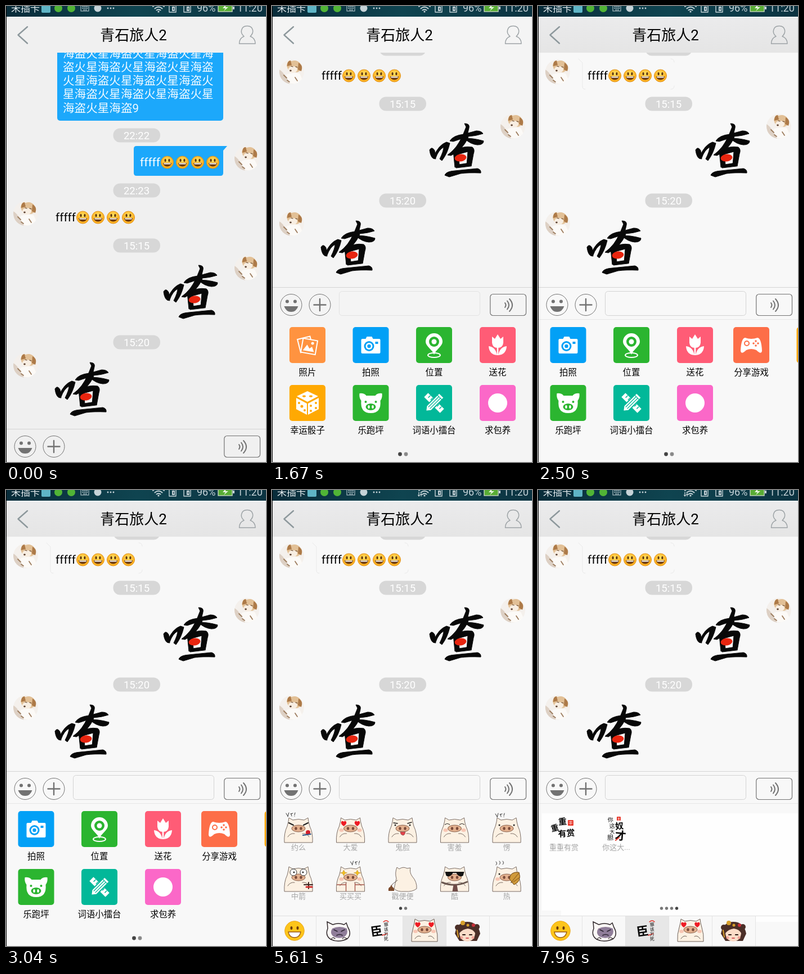
An HTML page that plays this animation: 462x811 px, repeating every 8000 ms.

```html
<!DOCTYPE html>
<html lang="zh">
<head>
<meta charset="utf-8">
<style>
html, body { margin: 0; width: 100%; height: 100%; overflow: hidden; background: #f0f0f0; }
svg { display: block; font-family: Roboto, "Noto Sans CJK SC", "Noto Sans CJK", sans-serif; }
.bg { fill: var(--bg); }
.line { fill: none; stroke-linecap: round; stroke-linejoin: round; }
</style>
</head>
<body>
<svg id="stage" width="462" height="811" viewBox="0 0 462 811"></svg>
<script>
const LOOP = 8000;

// Each step overrides parts of the state before it.
const steps = [
  { t: 0, bg: '#f0f0f0', shift: 0, view: '', s: 0, dot: 0, p: 0, box: 0, trim: 0, wifi: 0, white: 0 },
  { t: 270, bg: '#f3f3f3', shift: -252, view: 'tools' },
  { t: 1670, bg: '#f4f4f4', box: 0.55 },
  { t: 1790, s: 190, dot: 1 },
  { t: 2230, bg: '#f6f6f6', s: 226, box: 0.75 },
  { t: 2380, s: 172 },
  { t: 2500, bg: '#f8f8f8', s: 122, dot: 0, box: 1, trim: 1 },
  { t: 3310, view: 'stickers' },
  { t: 5610, wifi: 1 },
  { t: 7570, p: 0.35 },
  { t: 7690, p: 0.8 },
  { t: 7840, p: 0.97, white: 1 },
  { t: 7960, p: 1 }
];

const text = (x, y, size, str, fill = '#000', more = 'text-anchor="middle"') =>
  `<text x="${x}" y="${y}" font-size="${size}" fill="${fill}" ${more}>${str}</text>`;
const rect = (x, y, w, h, fill, more = '') =>
  `<rect x="${x}" y="${y}" width="${w}" height="${h}" fill="${fill}" ${more}/>`;
const oval = (x, y, rx, ry, fill, more = '') =>
  `<ellipse cx="${x}" cy="${y}" rx="${rx}" ry="${ry}" fill="${fill}" ${more}/>`;
const disc = (x, y, r, fill, more = '') => oval(x, y, r, r, fill, more);
const path = (d, fill, more = '') => `<path d="${d}" fill="${fill}" ${more}/>`;
const line = (d, color, w = 1, more = '') =>
  `<path class="line" d="${d}" stroke="${color}" stroke-width="${w}" ${more}/>`;
const at = (x, y, body, more = '') => `<g transform="translate(${x} ${y}) ${more}">${body}</g>`;
const ring = (color, w = 1) => `stroke="${color}" stroke-width="${w}"`;

const smile = (x, y) => at(x, y,
  disc(0, 0, 11, 'url(#gold)', ring('#dd8d16', 0.9)) +
  oval(-3.4, -3.6, 1.6, 2.7, '#5b3410') + oval(3.4, -3.6, 1.6, 2.7, '#5b3410') +
  path('M-7.5 1H7.5C7 9.500 -7 9.500 -7.5 1Z', '#6b3a12') + path('M-6.500 1.500H6.500L5.800 3.600H-5.800Z', '#fff'));

const avatar = (x, y) => at(x, y, `<g clip-path="url(#round)">` +
  disc(0, 0, 22, '#f4f0ec') +
  path('M-22 -4Q-15 0 -11 9L-3 22H-22Z', '#ddd0c4') +
  path('M-9 -11Q-7 -22 0 -19Q9 -22 15 -15L18 -6Q14 2 4 1Q-6 2 -9 -11Z', '#e2c096') +
  path('M-8 -10Q-8 -20 -2 -20L0 -12ZM12 -16Q21 -12 17 -1L11 -4Z', '#ad7a48') +
  oval(2, -4, 8, 6, '#f8eee2') + oval(-2, -2, 1.8, 1.4, '#5a4032') +
  line('M-1 -10L2 -9M7 -9L10 -8', '#68482f', 1.3) +
  path('M-10 5Q0 0 14 3L20 16Q8 24 -4 20Z', '#fcfaf7') +
  line('M-14 6L-9 11M-8 15L-4 18M6 10L10 16', '#9c7c5e', 1.8) + '</g>');

const pill = (y, str) => rect(190.5, y - 12.5, 83.5, 25, '#d7d7d7', 'rx="12"') +
  text(232, y + 6.5, 18.5, str, '#fff');

const fives = (x, y, color) => text(x, y, 20.7, 'fffff', color, '') +
  [0, 1, 2, 3].map(i => smile(x + 48.5 + i * 27, y - 7)).join('');

// Brush strokes of the big character: mouth, tree, sun, base.
const strokes = [
  'M1 48Q5 41 10 49L12 64Q3 65 1 48Z',
  'M8 60Q17 39 31 34L37 36Q33 54 23 67L19 64Q26 50 26 43Q17 48 12 62Z',
  'M63 1Q73 1 71 9L66 30L57 42L60 22L66 7Z',
  'M37 32Q43 22 62 20L84 14Q93 14 96 19Q84 23 70 24L43 33Z',
  'M59 23L70 25Q60 48 39 58L33 57Q51 44 59 23Z',
  'M63 28Q76 26 97 32Q97 39 86 39Q74 38 63 28Z',
  'M43 49L52 46L54 76L46 79Z',
  'M46 50Q60 40 77 43Q82 47 79 55L75 77L67 76L69 51L51 56Z',
  'M47 75L72 71L73 77L48 80Z',
  'M28 93Q30 86 46 85L86 81Q93 83 92 89Q70 88 56 90L36 96Z'
].join('');
const bigWord = (x, y) => at(x, y, path(strokes, '#080808', 'stroke="#080808" stroke-linejoin="round"') +
  oval(56, 62, 10.5, 6.5, '#e8250f', 'transform="rotate(-8 56 62)"'));

const longLine = '海盗火星'.repeat(14);
const lines = [0, 1, 2, 3].map(i => longLine.substr(i * 13, 13)).concat('海盗火星海盗9');

const list =
  rect(91, 40, 295, 164, '#1ca8fb', 'rx="5"') +
  lines.map((l, i) => text(101, 91.5 + i * 24.3, 20.6, l, '#f2faff', '')).join('') +
  pill(230, '22:22') + pill(328, '22:23') + pill(426, '15:15') + pill(598, '15:20') +
  path('M232 249H393L386 257V297Q386 302 381 302H232Q227 302 227 297V254Q227 249 232 249Z', '#1ca8fb') +
  fives(238, 285, '#fff') +
  `<g id="trim">${line('M72 346L79 353V395Q79 400 84 400M236 346Q242 346 242 352M242 394Q242 400 236 400', '#e9e9e9')}</g>` +
  fives(88, 383, '#000') +
  avatar(428, 271) + avatar(35, 369) + avatar(428, 466) + avatar(35, 639) +
  bigWord(279, 460) + bigWord(86, 633);

const grey = '#727272';
const bar = `<rect class="bg" x="1" y="752" width="461" height="320"/>` +
  rect(1, 752, 461, 1, '#d4d4d4') +
  disc(34, 783.5, 19, 'none', ring(grey)) + disc(27, 777.5, 3, grey) + disc(41, 777.5, 3, grey) +
  path('M21.5 786H46.5Q43 796 34 796Q25 796 21.5 786Z', grey) +
  disc(85, 783.5, 19, 'none', ring(grey)) + line('M74.5 783.5H95.5M85 773V794', grey, 2.4) +
  `<g id="box">${rect(119.5, 759.5, 250, 43, 'none', 'rx="5" ' + ring('#d3d3d3'))}</g>` +
  rect(387.8, 764.5, 63.7, 38, 'none', 'rx="5" ' + ring(grey, 1.2)) +
  line('M414 780Q417 784 414 788M418 776.5Q424 784 418 791.5M422 773Q432 784 422 795', grey, 2);

const W = '#fff';
const glyphs = {
  photo: c => at(-4, 0, rect(-11, -13, 23, 24, 'none', ring(W, 2)), 'rotate(-14)') +
    at(3, 3, rect(-13, -13, 26, 25, c, ring(W, 2)) + path('M-10 8L-4 -3L1 3L5 -1L10 8Z', W) + disc(5, -7, 2.5, W), 'rotate(10)'),
  camera: c => path('M-15 -11H-9L-7 -15H2L4 -11H15Q17 -11 17 -9V13Q17 15 15 15H-15Q-17 15 -17 13V-9Q-17 -11 -15 -11Z', W) +
    disc(-3, 2, 9, c) + disc(-3, 2, 6, W) + disc(-3, 2, 3.2, c) + rect(8, -6, 5, 4, c),
  pin: c => oval(0, 18, 11, 4, 'none', ring(W, 2)) + path('M0 17C-3 8 -15 2 -15 -6A15 15 0 0 1 15 -6C15 2 3 8 0 17Z', W) +
    disc(0, -6, 9, c) + disc(0, -6, 4.5, W),
  tulip: () => path('M-10 -15L-5 -11L0 -19L5 -11L10 -15V-4Q9 5 0 5Q-9 5 -10 -4Z', W) + rect(-1.3, 3, 2.6, 15, W) +
    path('M-1 18Q-15 17 -16 2Q-4 3 -1 18ZM1 18Q15 17 16 2Q4 3 1 18Z', W),
  dice: c => path('M0 -21L19 -12L0 -2L-19 -12ZM-20 -9L-1 1V21L-20 11ZM20 -9L1 1V21L20 11Z', W) +
    oval(-6, -12, 3, 1.8, c) + oval(6, -12, 3, 1.8, c) + disc(-10, 6, 2.5, c) + disc(-15, 0, 2, c) + disc(-5, 13, 2, c) +
    disc(6, 5, 2, c) + disc(15, 0, 2, c) + disc(6, 14, 2, c) + disc(15, 9, 2, c),
  pig: c => path('M-20 -17Q-12 -18 -8 -13H8Q12 -18 20 -17Q21 -9 17 -4Q19 18 0 18Q-19 18 -17 -4Q-21 -9 -20 -17Z', W) +
    disc(-9, -2, 2, c) + disc(9, -2, 2, c) + oval(0, 7, 9, 6, c) + oval(-3.5, 7, 1.8, 3, W) + oval(3.5, 7, 1.8, 3, W),
  pencil: c => at(0, 0, rect(-20, -5, 40, 10, W) + line('M-14 -4V0M-8 -4V0M8 -4V0M14 -4V0', c, 1.5), 'rotate(45)') +
    at(0, 0, path('M-21 0L-13 -6H19V6H-13Z', W, ring(c, 2)) + line('M-12 -2H14M-12 2H14M14 -6V6', c, 1.3), 'rotate(-45)'),
  ball: () => disc(0, 0, 17, W),
  pad: c => path('M-11 -13Q0 -9 11 -13Q18 -12 19 10Q18 18 9 9Q0 5 -9 9Q-18 18 -19 10Q-18 -12 -11 -13Z', W) +
    disc(-8, -3, 4, 'none', ring(c, 2)) + disc(8, -7, 1.8, c) + disc(8, 1, 1.8, c) + disc(4, -3, 1.8, c) + disc(12, -3, 1.8, c),
  card: c => rect(-20, -11, 40, 27, W, 'rx="2"') + rect(-14, -16, 5, 8, W, ring(c)) + rect(9, -16, 5, 8, W, ring(c)) +
    disc(-9, -1, 4, c) + path('M-16 11Q-15 4 -9 4Q-3 4 -2 11Z', c) + line('M3 -2H15M3 3H15M3 8H15', c, 2)
};

const cols = [63, 175.5, 288, 401, 501, 613.5];
const tools = [
  ['照片', '#ff9340', 'photo', 0, 0], ['拍照', '#02a0f6', 'camera', 1, 0],
  ['位置', '#2bb530', 'pin', 2, 0], ['送花', '#ff5c76', 'tulip', 3, 0],
  ['分享游戏', '#fd6e48', 'pad', 4, 0], ['名片', '#ffa902', 'card', 5, 0],
  ['幸运骰子', '#ffa902', 'dice', 0, 1], ['乐跑坪', '#2bb530', 'pig', 1, 1],
  ['词语小擂台', '#02b899', 'pencil', 2, 1], ['求包养', '#fb68c8', 'ball', 3, 1]
].map(([name, color, glyph, col, row]) => at(cols[col], 603 + row * 103,
  rect(-32, -32, 64, 64, color, 'rx="5"') + glyphs[glyph](color) + text(0, 53.5, 15.4, name))).join('');

const hair = '#6b5d55', skin = '#fcf1e3';
const star = (x, y) => path(`M${x} ${y - 5}L${x + 2} ${y - 1}L${x + 6} ${y}L${x + 2} ${y + 1}L${x} ${y + 5}L${x - 2} ${y + 1}L${x - 6} ${y}L${x - 2} ${y - 1}Z`, '#f6c21c', ring('#a87510', 0.5));
const heart = x => path(`M${x} -4C${x - 9} -10 ${x - 3} -16 ${x} -12C${x + 3} -16 ${x + 9} -10 ${x} -4Z`, '#ee1c24');
const marks = (x, y) => line(`M${x} ${y}l3 5m2 -6l-2 7m5 -5l4 -1m-3 1l1 4m6 -6l-1 4m0 2v.3`, '#333', 1);
const snout = oval(0, 0, 12, 6, '#e3b08e', ring('#7d5541', 0.9)) + oval(-4.5, 0, 2.2, 2.8, '#7a4a38') + oval(4.5, 0, 2.2, 2.8, '#7a4a38');
const dotEyes = disc(-13, -6, 1.5, '#222') + disc(13, -6, 1.5, '#222');
const head = 'L-18 -12L-17 -19L-10 -15Q0 -18 10 -15L17 -19L18 -12';
const body = path(`M-25 25Q-26 8 -20 -4${head}L20 -4Q26 8 25 25Z`, skin, ring(hair, 0.9)) +
  line('M-19 15Q-15 8 -7 9M19 15Q15 8 7 9', hair, 0.9);
const blush = oval(-16, 3, 4, 3, '#f7c6b4') + oval(16, 3, 4, 3, '#f7c6b4');

const pigs = [
  ['约么', snout + line('M-17 -10L-9 -6M17 -10L9 -6', '#222', 2) + marks(-22, -27) + disc(17, 7, 4, '#d3202b') + line('M8 12L22 10', '#2d568b', 2)],
  ['大爱', blush + snout + heart(-12) + heart(12)],
  ['鬼脸', snout + dotEyes + line('M-16 -10L-9 -9M9 -9L16 -11', '#222', 1.5) + path('M-4 6H5Q4 13 0 12Q-4 11 -4 6Z', '#e5424b', ring(hair, 0.6))],
  ['害羞', blush + snout + line('M-17 -7Q-13 -10 -9 -7M9 -7Q13 -10 17 -7', '#222', 1.2)],
  ['愣', snout + dotEyes + marks(-20, -26)],
  ['中箭', snout + disc(-9, -9, 6, W, ring('#333')) + disc(9, -9, 6, W, ring('#333')) + disc(-8, -9, 1.4, '#222') + disc(8, -9, 1.4, '#222') + line('M10 13H25M18 9V20', '#3c2420', 2) + line('M14 17H24', '#cf2a2a', 3)],
  ['买买买', blush + snout + star(-12, -8) + star(12, -8) + marks(0, -28) + line('M-24 13H-8M8 13H24M-8 10V24M8 10V24', '#a5554a', 1.4)],
  ['戳便便', ''],
  ['酷', snout + path('M-17 -10H17L15 -3Q8 1 3 -8H-3Q-8 1 -15 -3Z', '#111') + line('M-22 9Q0 18 22 8', '#6a5850', 3) + path('M-2 13L4 13L6 25H-4Z', '#6f4c48')],
  ['热', blush + snout + dotEyes + line('M-19 -28q3 3 0 6m6 -7q3 3 0 6m6 -6q3 3 0 6', '#333') + path('M5 3Q6 -11 22 -9Q27 7 13 13Z', '#d09a3a', ring('#6c4514')) + line('M8 9L21 -7M12 8L23 0', '#7e5117')]
];
const backPig = path('M-15 20Q-13 10 -11 2Q-14 -8 -10 -18L-6 -15Q1 -20 8 -16L14 -17Q12 -9 17 -2Q26 8 25 20Q18 26 4 25Q-10 26 -15 20Z', skin, ring(hair, 0.9)) +
  line('M-9 5L-18 12L-20 16', hair) + path('M-25 24Q-26 18 -22 17L-20 13L-18 17Q-14 19 -15 24Z', '#7b4a2c');
const pigPage = pigs.map(([name, extra], i) => {
  const x = 47 + (i % 5) * 92.5, row = i / 5 | 0;
  return at(x, 602 + row * 87, extra ? body + extra : backPig) + text(x, 640 + row * 87, 13, name, '#a6a6a6');
}).join('');

const inked = (x, y, size, str, turn = -5, weight = 500) =>
  text(0, 0, size, str, '#0a0a0a', `font-weight="${weight}" text-anchor="middle" transform="translate(${x} ${y}) rotate(${turn})"`);
const seal = (x, y, size) => rect(x, y, size, size, '#e8392c', 'rx="1"') +
  line(`M${x + 2} ${y + 3}h${size - 4}m0 3h${4 - size}m${size / 2 - 2} -4v${size - 4}`, '#fff', 0.7);
const inkPage = inked(31, 606, 14, '重', -14, 700) + inked(44, 595, 15, '重', -5, 700) + seal(53, 587, 10) + inked(51, 616, 15, '有赏', -5, 700) +
  inked(129, 590, 10, '你') + inked(132, 601, 10, '这') + inked(132, 611, 9, '大') + inked(129, 622, 11, '胆') +
  seal(140, 581, 7) + inked(145, 603, 15, '奴', -5, 700) + inked(146, 622, 20, '才', 5, 700) + line('M138 623L144 618', '#e8392c', 2) +
  text(46, 640, 13, '重重有赏', '#a6a6a6') + text(139, 640, 13, '你这大...', '#a6a6a6');

const grinTab = at(40, 784, disc(0, 0, 17.2, '#fdc51b', ring('#e9a316')) +
  oval(-5.500, -5, 2, 3, '#6d3c0e') + oval(5.500, -5, 2, 3, '#6d3c0e') +
  path('M-11 2H11Q9 12 0 12Q-9 12 -11 2Z', W, ring('#9a5a14', 1.3)));
const catTab = at(118, 786,
  path('M-20 -18L-10 -13Q0 -17 10 -13L14 -16L17 -8Q24 4 16 12Q0 20 -14 13Q-24 6 -19 -6Z', '#fbf8f6', ring('#2e2629', 1.5)) +
  path('M-11 -6Q2 -12 15 -6Q18 4 10 9Q0 13 -9 8Q-16 2 -11 -6Z', '#8f7d99') +
  line('M-8 -4L-2 -1M11 -4L5 -1M-3 6Q2 3 7 6', '#2d2633', 1.6) + line('M-13 13Q-10 8 -6 12M7 12Q10 8 15 12', '#2e2629', 1.2));
const girlTab = at(347, 785,
  path('M-22 4Q-18 -17 0 -17Q19 -17 23 4L17 17H-14Z', '#4b2f28') + disc(-17, -7, 5, '#4b2f28') + disc(17, -8, 5, '#4b2f28') +
  path('M-14 3Q-8 -4 1 -5Q10 -4 14 3Q13 17 0 18Q-13 17 -14 3Z', '#fbdcc8') +
  line('M-8 6H-4M4 6H8', '#2b1713', 2.2) + line('M-2 12H2', '#c9303a', 1.6) +
  disc(-10, 11, 2.5, '#f3a79b') + disc(10, 11, 2.5, '#f3a79b') + disc(-8, -15, 4, '#d8a02c') + disc(1, -11, 2.5, '#d8a02c') + disc(11, -11, 3, '#c9303a') + line('M-18 -2L-16 10', '#d8a02c', 2));
const tabs = rect(1, 757, 461, 1, '#e0e0e0') + `<rect id="tab" y="758" width="77" height="53" fill="#e7e7e7"/>` +
  [78, 155, 232, 309, 386].map(x => rect(x, 758, 1, 53, '#e4e4e4')).join('') +
  grinTab + catTab +
  inked(187, 792, 21, '臣', -8, 700) + line('M198 768Q203 764 207 768M196 792L205 789', '#dd2b22', 1.4) +
  [...'罪该万死'].map((c, i) => inked(203, 776 + i * 8.5, 8, c)).join('') +
  at(271, 782, path(`M-23 21Q-24 8 -20 -4${head}L20 -4Q24 8 23 21Z`, skin, ring(hair)) +
    blush + snout + heart(-12) + heart(12) + line('M-17 16Q-12 9 -7 12M17 16Q12 9 7 12', hair)) + girlTab;

const dim = '#c6d3d8';
const status = rect(1, 0, 461, 19, 'url(#night)') +
  text(9, 9.5, 17, '未插卡', '#e6edf0', '') + rect(63, -4, 16, 16, '#5fb5c6', 'rx="2"') +
  disc(93, 4, 7, '#51b436') + disc(116, 4, 7, '#51b436') +
  rect(133, -2, 14, 11, 'none', ring(dim)) + line('M136 1H145M136 4H145M138 7H143', dim, 1.3, 'stroke-dasharray="1.5 2"') +
  disc(163, 4, 6.5, dim) + disc(181, 4, 1.4, dim) + disc(186, 4, 1.4, dim) + disc(191, 4, 1.4, dim) +
  line('M261 1Q271 -7 281 1M264.5 4.5Q271 -1 277.5 4.5M267.5 7.5Q271 5 274.5 7.5', dim, 2) + disc(271, 10, 1.6, dim) +
  `<g id="wifi">${line('M261 4V11M259.5 9L261 11L262.5 9M265 11V7M263.5 8.5L265 6.5L266.5 8.5', '#fff', 1)}</g>` +
  [290, 316].map(x => line(`M${x} -2V11H${x + 12}V-2`, dim, 1.4) + rect(x + 5, 1, 5, 8, dim) + rect(x + 7, 3, 1.2, 4, '#0e3543')).join('') +
  text(339, 10, 18, '96%', dim, '') + rect(377, -3, 25, 13, '#59ad35', ring('#cfdcc9', 1.3)) + rect(403, 1, 3, 5, dim) +
  path('M391 -3L385 4H390L387 9L395 2H390Z', '#e9f6e2') + text(411, 10, 18, '11:20', dim, '');

const header = `<rect class="bg" x="1" y="19" width="461" height="64"/>` + rect(1, 19, 461, 64, 'url(#sheen)', 'id="head"') +
  rect(1, 19, 461, 2, '#fafafa') + text(226.5, 61, 26, '青石旅人2') +
  line('M38 37L21.5 51.5L38 66.5', '#8d989c', 2.4) +
  line('M423 54Q417 49 418.5 43Q420 35.5 428.5 35.5Q437 35.5 438.5 43Q439.5 49 434 54Q443 57 443 67H414.5Q414.5 57 423 54Z', '#9da3a6', 1.5);

const $ = id => document.getElementById(id);
const stage = $('stage');
stage.innerHTML = `<defs>
  <radialGradient id="gold" cy="35%"><stop stop-color="#ffe264"/><stop offset="1" stop-color="#fdb022"/></radialGradient>
  <linearGradient id="night"><stop stop-color="#082c3a"/><stop offset=".5" stop-color="#0f4450"/><stop offset="1" stop-color="#0b3341"/></linearGradient>
  <linearGradient id="sheen" x2="0" y2="1"><stop stop-color="#ebebec"/><stop offset="1" stop-color="#e5e5e5"/></linearGradient>
  <clipPath id="round"><circle r="22"/></clipPath></defs>
  <rect class="bg" width="462" height="811"/>
  <g id="list">${list}</g><g id="bar">${bar}</g>
  <g id="edge">${rect(1, 557, 461, 1, '#e6e6e6')}</g>
  <g id="tools"><g id="strip">${tools}</g>${disc(227.5, 797, 3.4, '#888', 'id="d0"')}${disc(238, 797, 3.4, '#888', 'id="d1"')}</g>
  <g id="stickers"><path id="white" d="M7 575H462V768H387V757H41V748H7Z" fill="#fefefe"/>
    <g id="pigs">${pigPage}</g><g id="inks">${inkPage}</g><g id="dots"></g>${tabs}</g>
  ${header}${status}${rect(0, 0, 1, 811, '#000')}`;

const show = (id, on) => $(id).style.opacity = +on;
const move = (id, x, y) => $(id).setAttribute('transform', `translate(${x} ${y})`);
const pageDots = (n, active) => Array.from({ length: n }, (_, i) =>
  disc(233 + (i - (n - 1) / 2) * 9, 744, 2.7, i === active ? '#444' : '#777')).join('');

function draw(time) {
  const st = Object.assign({}, ...steps.filter(k => k.t <= time));
  const inks = st.p > 0.5;
  stage.style.setProperty('--bg', st.bg);
  move('list', 0, st.shift);
  move('bar', 0, st.shift);
  move('strip', -st.s, 0);
  move('pigs', st.p * 461, 0);
  move('inks', (st.p - 1) * 461, 0);
  show('tools', st.view === 'tools');
  show('stickers', st.view === 'stickers');
  show('box', st.box);
  for (const id of ['trim', 'head', 'edge']) show(id, st.trim);
  show('wifi', st.wifi);
  show('white', st.white);
  [0, 1].forEach(i => $('d' + i).setAttribute('fill', i === st.dot ? '#444' : '#8a8a8a'));
  $('tab').setAttribute('x', inks ? 155 : 232);
  $('dots').innerHTML = inks ? pageDots(4, 3) : pageDots(2, 0);
}

const start = performance.now();
function tick() {
  draw((performance.now() - start) % LOOP);
  requestAnimationFrame(tick);
}
tick();
</script>
</body>
</html>
```
